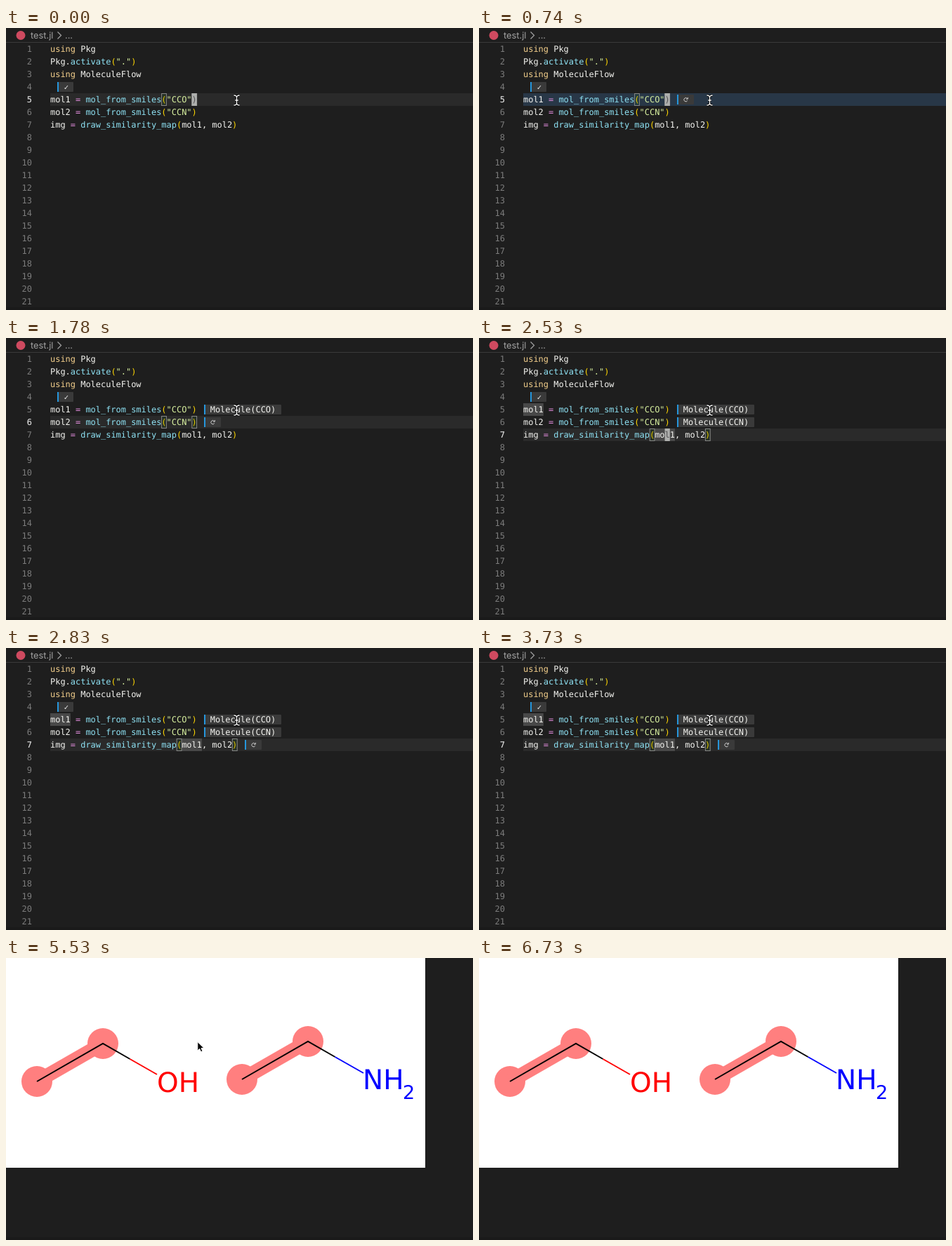
Write an HTML page that moves like this. It is 665x402 px and loops after 7.48 s.

```html
<!DOCTYPE html>
<html lang="en">
<head>
<meta charset="utf-8">
<title>Similarity map</title>
<style>
  html, body { margin: 0; width: 100%; height: 100%; overflow: hidden; background: #1e1e1e; }
  svg { display: block; width: 665px; height: 402px; }
  text { white-space: pre; text-rendering: geometricPrecision; }
  .code { font: 11.96px "DejaVu Sans Mono", monospace; fill: #f4f4f0; }
  .num { fill: #7c7c7c; text-anchor: end; }
  .num.active { fill: #dcdcdc; }
  .kw { fill: #f3cf8c; }
  .op { fill: #e58ee0; }
  .fn { fill: #8fe3f5; }
  .str { fill: #d9f2a0; }
  .par { fill: #ffd700; }
  .caret { fill: #515052; }
  .crumb { font: 12.8px Inter, sans-serif; fill: #a3a3a3; }
  .check { font: 9.5px "DejaVu Sans", sans-serif; fill: #eee; }
  .atom { font: 39px "DejaVu Sans", sans-serif; }
  .sub { font-size: 27px; }
  .line { fill: none; stroke-width: 2; }
  .halo { fill: #ff7f7f; }
  .band { stroke: #ff7f7f; stroke-width: 20; }
  .beam path { fill: none; stroke: #fff; stroke-width: 1.3; }
  .beam path:first-child { stroke: #000; stroke-width: 3; }
</style>
</head>
<body>
<svg viewBox="0 0 665 402">
  <defs>
    <g id="ethyl">
      <circle class="halo" r="22"/>
      <circle class="halo" cx="94" cy="-54" r="22"/>
      <path class="band" d="M0 0L94-54"/>
      <path class="line" stroke="#000" d="M0 0L94-54L132.5-32"/>
    </g>
  </defs>
  <rect width="665" height="402" fill="#1e1e1e"/>
  <g id="editor" data-on="0-5530">
    <circle cx="21" cy="10.5" r="6.5" fill="#cf4a60"/>
    <text class="crumb" x="35" y="15">test.jl</text>
    <path d="M73.5 5.5l5 5-5 5" fill="none" stroke="#a3a3a3" stroke-width="1.2"/>
    <text class="crumb" x="84" y="15">...</text>
    <rect y="20" width="665" height="1" fill="#3a3a3a"/>
  </g>
  <g data-on="5530-7480">
    <rect width="597" height="299" fill="#fff"/>
    <use href="#ethyl" x="44" y="176"/>
    <path class="line" stroke="#f00" d="M176.5 144L215 166"/>
    <text class="atom" x="215" y="191" fill="#f00">OH</text>
    <use href="#ethyl" x="336" y="173"/>
    <path class="line" stroke="#00f" d="M468.5 141L509 164"/>
    <text class="atom" x="508" y="187" fill="#00f">NH<tspan class="sub" x="565" y="201">2</tspan></text>
  </g>
  <rect y="398" width="665" height="4" fill="#1a1a1a"/>
  <g id="pointers"></g>
</svg>
<script>
(() => {
  const LOOP = 7480, END = 5530, CELL = 7.2, LEFT = 63, ROW = 18;
  const editor = document.getElementById('editor');
  const pointers = document.getElementById('pointers');

  const add = (parent, markup) => parent.insertAdjacentHTML('beforeend', markup);
  const rowTop = row => 3 + ROW * row;
  const column = n => LEFT + n * CELL;
  const block = (row, x, width, fill, on) =>
    add(editor, `<rect x="${x}" y="${rowTop(row)}" width="${width}" height="${ROW}" fill="${fill}" data-on="${on}"/>`);
  const write = (row, x, content, style = '', on = `0-${END}`) =>
    add(editor, `<text class="code ${style}" x="${x}" y="${rowTop(row) + 13.3}" data-on="${on}">${content}</text>`);
  const span = (style, content) => `<tspan class="${style}">${content}</tspan>`;
  const call = (fn, args) => span('fn', fn) + span('par', '(') + args + span('par', ')');
  const assign = (name, value) => `${name} ${span('op', '=')} ${value}`;
  const badge = (row, x, width, on, content) =>
    add(editor, `<g data-on="${on}" transform="translate(${x} ${rowTop(row) + 2})">
      <rect width="${width}" height="14" rx="1" fill="#3a3a3a"/>
      <rect width="2" height="14" fill="#2596dc"/>${content}</g>`);

  const spinner = `<path d="M14.6 5.7a2.6 2.6 0 1 0 .2 2.7M15.3 3.9v2.3h-2.3"
    fill="none" stroke="#ddd" stroke-width=".9"/>`;
  const result = value => `<text class="code" x="8.7" y="11.3">${value}</text>`;

  const lines = [
    span('kw', 'using') + ' Pkg',
    'Pkg.' + call('activate', span('str', '"."')),
    span('kw', 'using') + ' MoleculeFlow',
    '',
    assign('mol1', call('mol_from_smiles', span('str', '"CCO"'))),
    assign('mol2', call('mol_from_smiles', span('str', '"CCN"'))),
    assign('img', call('draw_similarity_map', 'mol1, mol2'))
  ];

  // Rows in the order they are evaluated, with the times of each highlight.
  const steps = [
    { row: 5, active: '0-1340', flash: '740-1040', cursor: '0-290 740-1340',
      glyph: ')', brackets: [22, 28], paired: '0-1340' },
    { row: 6, active: '1340-2230', flash: '1630-1780', cursor: '1340-1780',
      glyph: ')', brackets: [22, 28], paired: '1340-2380' },
    { row: 7, active: '2230-5530', flash: '2680-2830',
      cursor: '2230-2830 3280-3730 4330-4780 5230-5530',
      glyph: 'l', brackets: [25, 36], paired: '2380-5530' }
  ];

  for (const { row, active, flash } of steps) {
    block(row, LEFT, 602, '#2a2a2a', active);
    block(row, LEFT, 602, '#264f7860', flash);
  }
  block(5, column(0), 4 * CELL, '#484848', `2530-${END}`);
  block(7, column(26), 4 * CELL, '#484848', `2530-${END}`);

  for (let row = 1; row <= 21; row++) write(row, 37, row, 'num');
  lines.forEach((line, i) => write(i + 1, LEFT, line));

  for (const { row, active, cursor, glyph, brackets, paired } of steps) {
    write(row, 37, row, 'num active', active);
    for (const n of brackets)
      add(editor, `<rect x="${column(n) + .2}" y="${rowTop(row) + .5}" width="${CELL - .4}" height="17"
        fill="#0064001a" stroke="#888" data-on="${paired}"/>`);
    block(row, column(28), CELL, '#aeafad', cursor);
    write(row, column(28), glyph, 'caret', cursor);
  }

  badge(4, 73, 23, `0-${END}`, '<text class="check" x="9" y="10.5">✓</text>');
  badge(5, 282, 24, '740-1190', spinner);
  badge(5, 282, 110, `1190-${END}`, result('Molecule(CCO)'));
  badge(6, 282, 24, '1630-2230', spinner);
  badge(6, 282, 110, `2230-${END}`, result('Molecule(CCN)'));
  badge(7, 340, 24, `2680-${END}`, spinner);

  const beamPath = '<path d="M-4-7q4 0 4 3v8q0 3-4 3M4-7q-4 0-4 3v8q0 3 4 3M-2.2 0h4.4"/>';
  const beam = `<g class="beam">${beamPath.repeat(2)}</g>`;
  const arrow = '<path d="M0 0v12.6l2.9-2.7 1.9 4.4 2.3-1-1.9-4.2h4z" stroke="#fff"/>';
  const pointer = (shape, on, x, y) =>
    add(pointers, `<g data-on="${on}" transform="translate(${x} ${y})">${shape}</g>`);
  pointer(beam, '0-5080', 328.5, 103);
  pointer(beam, '5080-5230', 319.5, 107.5);
  pointer(beam, '5230-5380', 273.5, 117);
  pointer(beam, '5380-5530', 274, 119.5);
  pointer(arrow, '5530-5680', 272.8, 119.5);
  pointer(arrow, '5680-5830', 284, 135);
  pointer(arrow, '5830-6580', 297.5, 154);
  pointer(arrow, '6580-6730', 544, 388.5);

  const timed = [...document.querySelectorAll('[data-on]')].map(el => ({
    el, spans: el.dataset.on.split(' ').map(s => s.split('-').map(Number))
  }));
  const start = performance.now();

  function draw() {
    const t = (performance.now() - start) % LOOP;
    for (const { el, spans } of timed)
      el.style.display = spans.some(([from, to]) => t >= from && t < to) ? '' : 'none';
    requestAnimationFrame(draw);
  }
  draw();
})();
</script>
</body>
</html>
```
